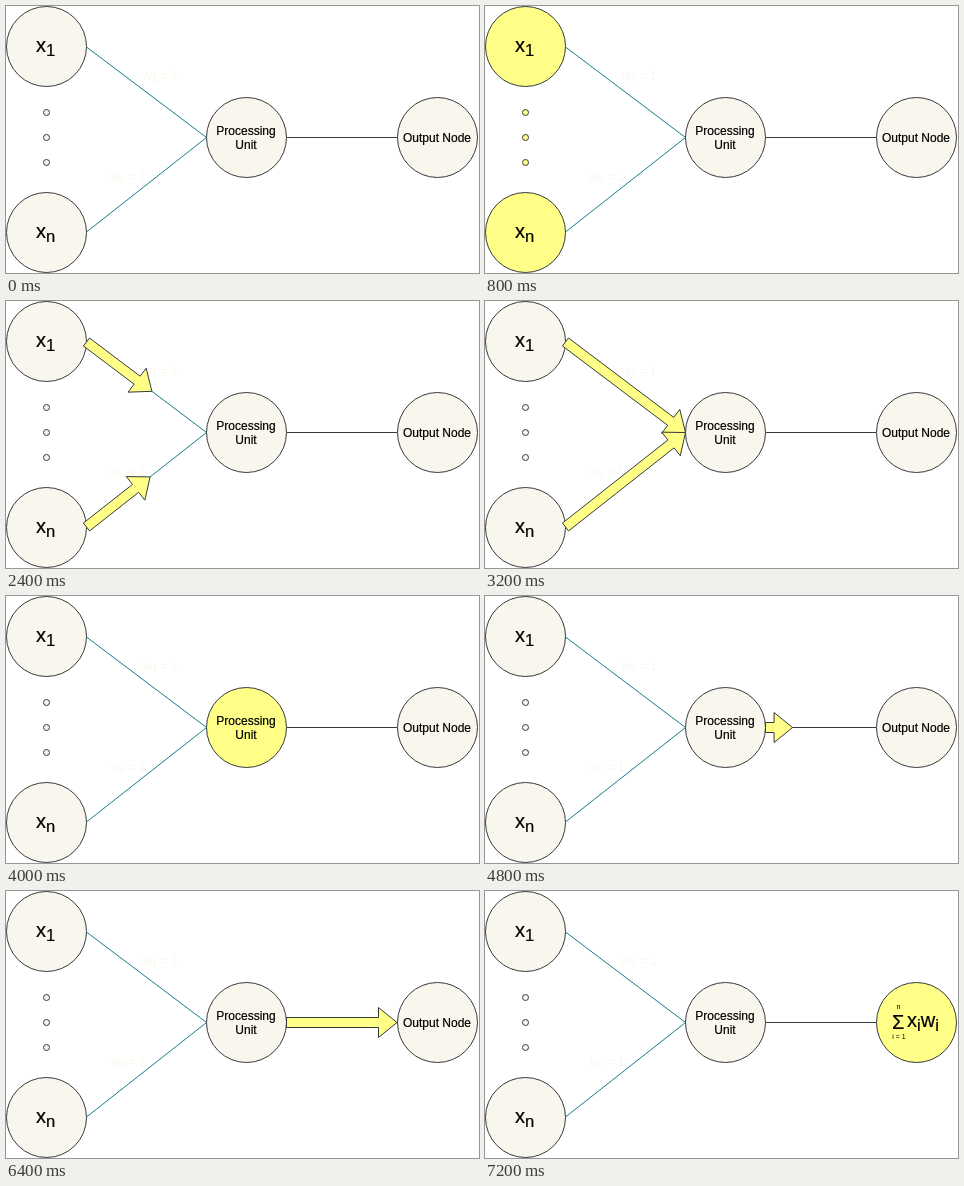
Recreate the animation shown at these times as an HTML page. Size 473x267 px, loop 8400 ms.

```html
<!DOCTYPE html>
<html lang="en">
<head>
<meta charset="utf-8">
<title>Processing unit</title>
<style>
  html, body { margin: 0; width: 100%; height: 100%; overflow: hidden; background: #fff; }
  svg { display: block; width: 473px; height: 267px; }
  circle, .arrow { stroke: #36393d; fill: #f9f7ed; }
  .arrow, .lit { fill: #ffff88; }
  .link { stroke: #0e8088; }
  .out { stroke: #36393d; }
  text { font: 12px "Liberation Sans", Arial, sans-serif; stroke: #000; stroke-width: .2; }
  .mid { text-anchor: middle; }
  .big { font-size: 20px; }
  .sub { font-size: 16.67px; }
  .tiny { font-size: 7px; stroke: none; }
  .weight { fill: #f9f7ed; stroke: none; }
  .weight .sub { font-size: 10px; }
</style>
</head>
<body>
<svg viewBox="0 0 473 267">
  <path class="link" d="M80.5 41L200.5 131.5"/>
  <path class="link" d="M80.5 226L200.5 131.5"/>
  <path class="out" d="M280.5 131.5H391.5"/>
  <g id="nodes"></g>
  <text class="big" x="30" y="46">x<tspan class="sub" dy="4">1</tspan></text>
  <text class="big" x="30" y="232">x<tspan class="sub" dy="4">n</tspan></text>
  <text class="mid" x="240" y="129">Processing</text>
  <text class="mid" x="240" y="143">Unit</text>
  <text class="weight" x="137" y="74">w<tspan class="sub" dy="2">1</tspan><tspan dy="-2"> = 1</tspan></text>
  <text class="weight" x="105" y="175">w<tspan class="sub" dy="2">n</tspan><tspan dy="-2"> = 1</tspan></text>
  <text id="label" class="mid" x="431" y="136">Output Node</text>
  <g id="sum">
    <text class="tiny mid" x="413.5" y="118">n</text>
    <text class="big" x="407" y="138">Σ</text>
    <text class="tiny mid" x="414" y="148">i = 1</text>
    <text class="big" x="422" y="136">x<tspan class="sub" dy="4">i</tspan><tspan dy="-4">w</tspan><tspan class="sub" dy="4">i</tspan></text>
  </g>
  <g id="arrows"></g>
</svg>
<script>
const STEP = 800, LOOP = 8400;
const [INPUTS, UNIT, OUTPUT] = [1, 5, 9];
const $ = id => document.getElementById(id);

function add(parent, tag, attrs) {
  const el = document.createElementNS("http://www.w3.org/2000/svg", tag);
  for (const key in attrs) el.setAttribute(key, attrs[key]);
  return parent.appendChild(el);
}

// Each node lights up during one step.
const nodes = [
  [40.5, 40.5, 40, INPUTS], [40.5, 226.5, 40, INPUTS],
  [40.5, 106.5, 3, INPUTS], [40.5, 131.5, 3, INPUTS], [40.5, 156.5, 3, INPUTS],
  [240.5, 131.5, 40, UNIT], [431.5, 131.5, 40, OUTPUT]
].map(([cx, cy, r, step]) => ({ step, el: add($("nodes"), "circle", { cx, cy, r }) }));

// Each arrow grows along its link over three steps.
const arrows = [
  { from: [80.5, 41], to: [200.5, 131.5], start: 2, reach: [.19, .545, 1] },
  { from: [80.5, 226], to: [200.5, 131.5], start: 2, reach: [.175, .53, 1] },
  { from: [280.5, 131.5], to: [391, 131.5], start: 6, reach: [.245, .605, 1] }
].map(a => ({ ...a, el: add($("arrows"), "path", { class: "arrow" }) }));

function arrowPath({ from: [x, y], to: [u, v] }, reach) {
  const full = Math.hypot(u - x, v - y), dx = (u - x) / full, dy = (v - y) / full;
  const tip = full * reach, neck = tip - 18.5;
  const outline = [[0, -5], [neck, -5], [neck, -15], [tip, 0], [neck, 15], [neck, 5], [0, 5]];
  return "M" + outline.map(([a, b]) => [x + a * dx - b * dy, y + a * dy + b * dx]).join("L") + "Z";
}

function draw(now) {
  const step = Math.min(OUTPUT, Math.floor(now % LOOP / STEP));
  for (const n of nodes) n.el.classList.toggle("lit", n.step === step);
  for (const a of arrows) {
    const reach = a.reach[step - a.start];
    a.el.setAttribute("d", reach ? arrowPath(a, reach) : "");
  }
  $("label").style.display = step === OUTPUT ? "none" : "";
  $("sum").style.display = step === OUTPUT ? "" : "none";
}

let origin;
function tick(now) {
  origin ??= now;
  draw(now - origin);
  requestAnimationFrame(tick);
}
draw(0);
requestAnimationFrame(tick);
</script>
</body>
</html>
```
